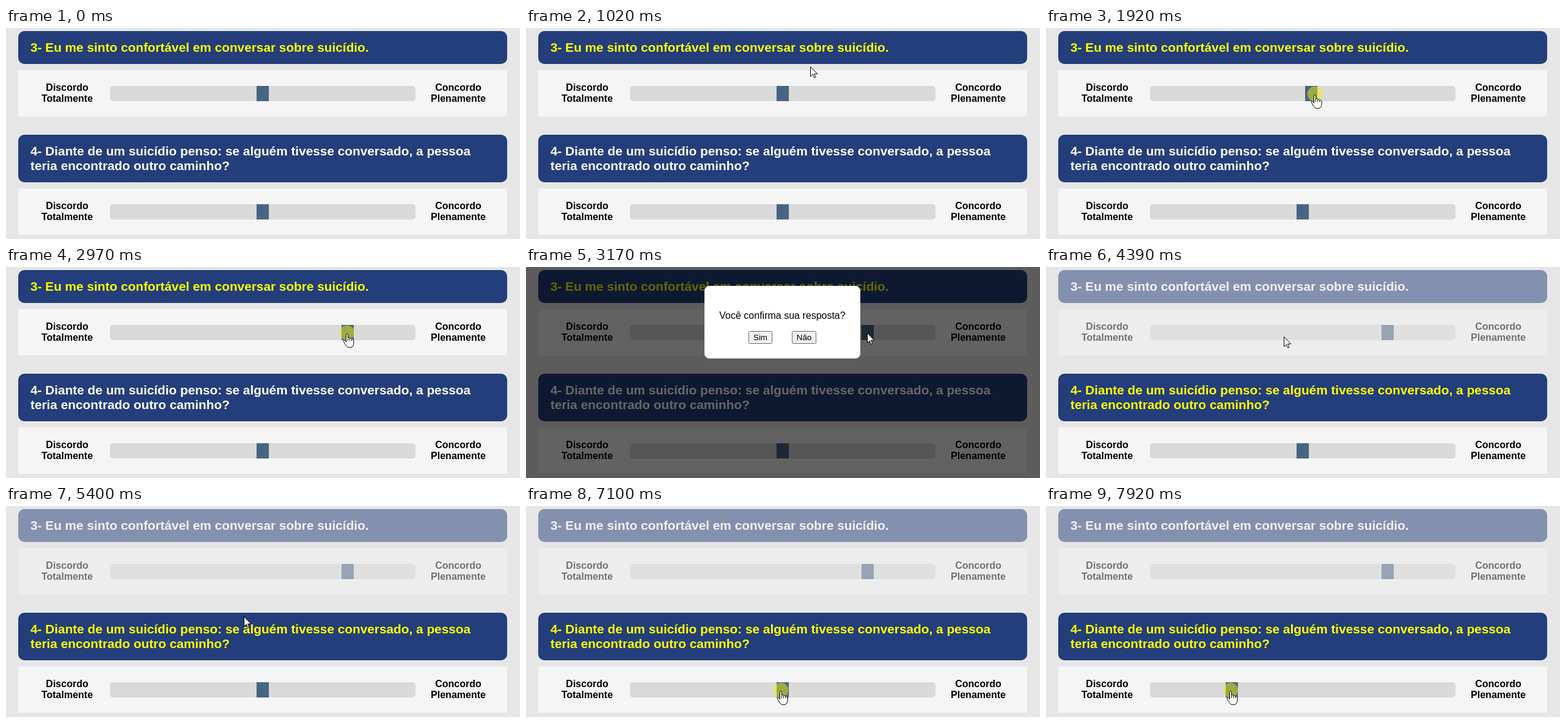
An HTML page that plays this animation: 841x346 px, repeating every 7.99 s.

```html
<!DOCTYPE html>
<html lang="pt-BR">
<head>
<meta charset="utf-8">
<title>Questionário</title>
<style>
  html, body { margin: 0; width: 100%; height: 100%; overflow: hidden; background: #e6e6e6; }
  svg { display: block; width: 841px; height: 346px; font-family: "Liberation Sans", Arial, sans-serif; }
  .head { fill: #233e7a; }
  .title { font-weight: bold; font-size: 20.8px; fill: #fff; }
  .active .title { fill: #ff0; }
  .done { opacity: .5; }
  .panel { fill: #f5f5f5; }
  .label { font-weight: bold; font-size: 16px; text-anchor: middle; }
  .track { fill: #d9d9d9; }
  .knob { fill: #486584; }
  .ask { font-size: 16px; text-anchor: middle; }
  .button rect { fill: #efefef; stroke: #6b6b6b; }
  .button text { font-size: 13.333px; text-anchor: middle; }
  .button.hover rect { fill: #e5e5e5; }
  .button.pressed rect { fill: #f5f5f5; stroke: #8d8d8d; }
  .halo { fill: #f4f000; opacity: .5; }
  .pointer { fill: #fff; stroke: #000; stroke-linejoin: round; }
</style>
</head>
<body>
<svg viewBox="0 0 841 346">
  <defs>
    <g id="scale">
      <rect class="panel" x="20" width="800" height="76"/>
      <g class="label">
        <text x="100" y="34">Discordo</text>
        <text x="100" y="52">Totalmente</text>
        <text x="740" y="34">Concordo</text>
        <text x="740" y="52">Plenamente</text>
      </g>
      <rect class="track" x="170" y="26" width="500" height="25" rx="5"/>
    </g>
  </defs>

  <g id="first">
    <rect class="head" x="20" y="5" width="800" height="54" rx="10"/>
    <text class="title" x="40" y="39">3- Eu me sinto confortável em conversar sobre suicídio.</text>
    <use href="#scale" y="69"/>
    <rect class="knob" id="knob1" y="95" width="20" height="25"/>
  </g>

  <g id="second">
    <rect class="head" x="20" y="175" width="800" height="78" rx="10"/>
    <text class="title" x="40" y="209">4- Diante de um suicídio penso: se alguém tivesse conversado, a pessoa</text>
    <text class="title" x="40" y="233">teria encontrado outro caminho?</text>
    <use href="#scale" y="263"/>
    <rect class="knob" id="knob2" y="289" width="20" height="25"/>
  </g>

  <g id="dialog">
    <rect width="841" height="346" opacity=".6"/>
    <rect x="292" y="31" width="255" height="119" rx="8" fill="#fff"/>
    <text class="ask" x="419.5" y="85">Você confirma sua resposta?</text>
    <g class="button" id="yes">
      <rect x="364.5" y="105.5" width="38" height="20" rx="2"/>
      <text x="383.5" y="120">Sim</text>
    </g>
    <g class="button">
      <rect x="435.5" y="105.5" width="39" height="20" rx="2"/>
      <text x="455" y="120">Não</text>
    </g>
  </g>

  <g id="cursor">
    <circle class="halo" id="halo" r="12.3"/>
    <path class="pointer" id="arrow" d="M.5 .5V16.5L4.2 13.1L6.7 18.7L9 17.7L6.5 12.2H11.7Z"/>
    <g class="pointer" id="hand" transform="translate(.5 1)">
      <path d="M-2 14V2.5Q-2 .8-.5 .8Q1 .8 1 2.5V7.5Q1.2 6.2 2.6 6.5Q4 6.8 4 8.5Q4.4 7.3 5.8 7.7Q7 8.1 7.2 9.5Q8 8.5 9.3 9.2Q10.5 10 10.5 12V15.5Q10.5 23 3.5 23Q-.5 23-2.5 19.5L-6 13.5Q-6.8 11.8-5.4 11Q-4 10.6-2 14Z"/>
      <path d="M1 7.5V12M4 8.5V12M7.2 9.5V12" fill="none"/>
    </g>
  </g>
</svg>

<script>
const LOOP = 7990, TICK = 70;
const el = id => document.getElementById(id);

const linear = p => p;
const easeOut = p => Math.sin(p * Math.PI / 2);
const easeInOut = p => (1 - Math.cos(p * Math.PI)) / 2;

// Each move starts where the previous one ended; "via" bends it into a curve.
const entry = { x: 804, y: 332 };
const moves = [
  { start: 460, end: 1300, ease: easeInOut, via: { x: 480, y: -50 }, to: { x: 417, y: 108 } },
  { start: 1700, end: 1920, ease: linear, to: { x: 440, y: 108 } },
  { start: 1920, end: 2970, ease: easeOut, to: { x: 558, y: 108 } },
  { start: 3370, end: 3990, ease: easeInOut, to: { x: 389, y: 114 } },
  { start: 5120, end: 5950, ease: linear, via: { x: 383, y: 223 }, to: { x: 412, y: 278 } },
  { start: 5950, end: 6570, ease: easeOut, to: { x: 417, y: 302 } },
  { start: 7100, end: 7920, ease: easeInOut, to: { x: 302, y: 302 } }
];

const mix = (a, b, p) => a + (b - a) * p;
const mixPoint = (a, b, p) => ({ x: mix(a.x, b.x, p), y: mix(a.y, b.y, p) });
const within = (t, from, to) => t >= from && t < to;

function cursorAt(t) {
  const i = moves.findLastIndex(move => move.start <= t);
  if (i < 0) return entry;
  const { start, end, ease, via, to } = moves[i];
  const from = i ? moves[i - 1].to : entry;
  const ticked = Math.floor((t - start) / TICK) * TICK;
  const p = t >= end ? 1 : ease(ticked / (end - start));
  return via ? mixPoint(mixPoint(from, via, p), mixPoint(via, to, p), p) : mixPoint(from, to, p);
}

// The knob snaps to 100 steps and trails the dragging cursor slightly.
function setKnob(id, t, grab, release) {
  const grip = 3, lag = 50;
  const x = cursorAt(Math.min(t - lag, release)).x + grip;
  const value = t - lag < grab ? 50 : Math.round((x - 180) / 4.8);
  el(id).setAttribute("x", Math.floor(170 + value * 4.8));
}

function show(id, on) {
  el(id).style.display = on ? "" : "none";
}

function draw(t) {
  const confirmed = t >= 4390;
  el("first").setAttribute("class", confirmed ? "done" : "active");
  el("second").setAttribute("class", confirmed ? "active" : "");
  setKnob("knob1", t, 1700, 3170);
  setKnob("knob2", t, 7100, LOOP);

  const { x, y } = cursorAt(t);
  show("dialog", within(t, 3170, 4390));
  el("yes").setAttribute("class", "button " + (t >= 4260 ? "pressed" : x < 403 ? "hover" : ""));

  const pointing = within(t, 1230, 3170) || t >= 6160;
  show("cursor", t >= 460);
  show("hand", pointing);
  show("arrow", !pointing);
  show("halo", within(t, 1700, 3170) || within(t, 4260, 4390) || t >= 7100);
  el("cursor").setAttribute("transform", `translate(${Math.round(x)} ${Math.round(y)})`);
}

let origin;
function frame(now) {
  origin ??= now;
  draw((now - origin) % LOOP);
  requestAnimationFrame(frame);
}
draw(0);
requestAnimationFrame(frame);
</script>
</body>
</html>
```
